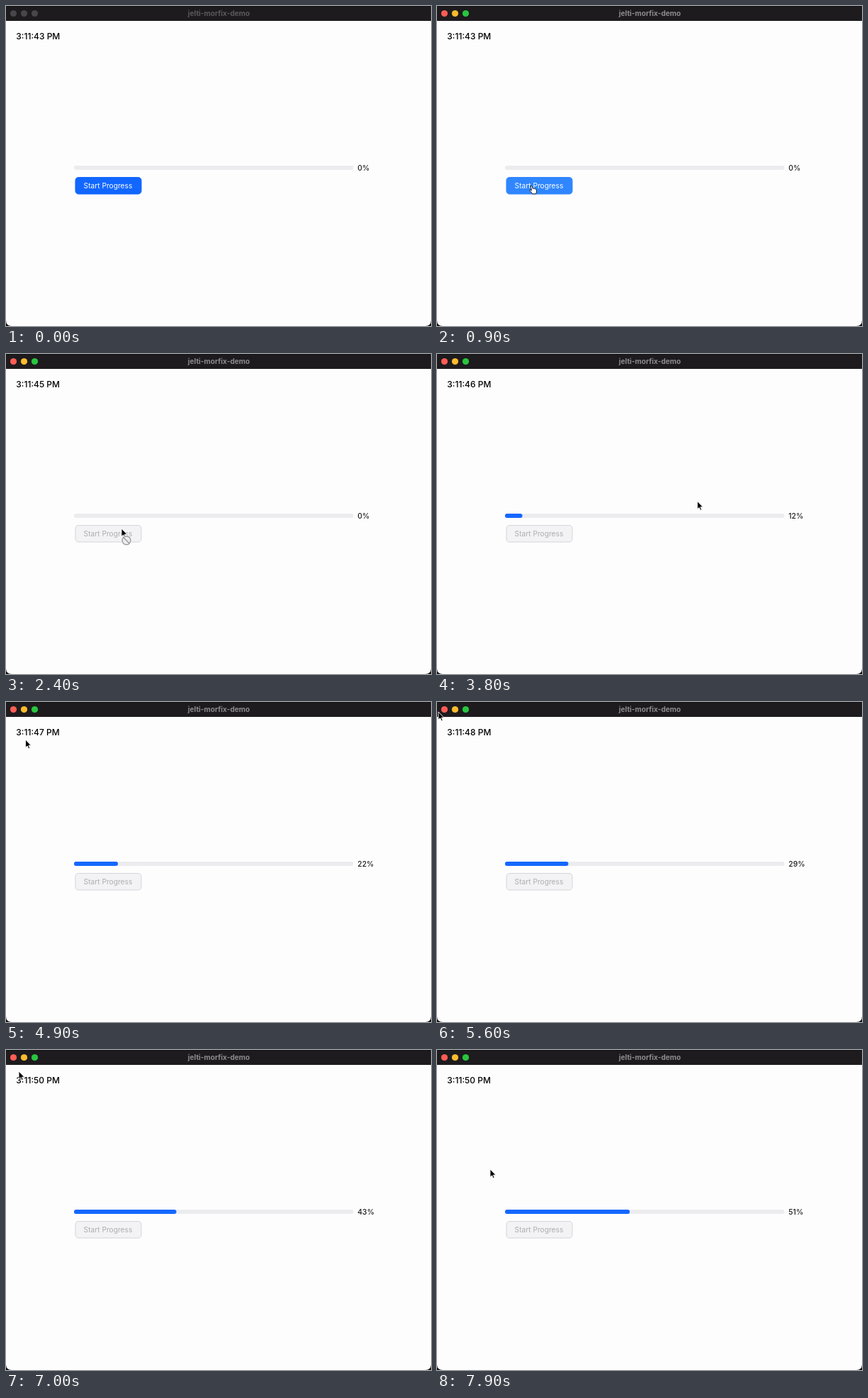
These frames come from a looping animation (600x451 px, 8 s). An HTML page:

```html
<!DOCTYPE html>
<html lang="en">
<head>
<meta charset="utf-8">
<title>Progress window</title>
<style>
  html, body { margin: 0; width: 100%; height: 100%; overflow: hidden; background: #0d100f; }
  svg { display: block; width: 600px; height: 451px; font-family: Inter, "Open Sans", sans-serif; }
  text { font-weight: 500; }

  #title { font-size: 10.1px; font-weight: 700; text-anchor: middle; fill: #5b595c; }
  #clock { font-size: 12px; fill: #000; }
  #percent { font-size: 10.4px; fill: #1a1a1b; }
  #lights { fill: #484649; }
  #button { fill: #1167ff; stroke: #1167ff; }
  #label { font-size: 10.2px; font-weight: 400; fill: #fff; }

  .active #title { fill: #8d8b8e; }
  .active #red { fill: #ff5d55; }
  .active #yellow { fill: #febb2d; }
  .active #green { fill: #29c63f; }
  .active #button { fill: #2f86ff; stroke: #2f86ff; }
  .disabled #button { fill: #f3f2f4; stroke: #d5d4d7; }
  .disabled #label { fill: #adacaf; }

  #arrow, #hand, #forbidden { visibility: hidden; }
  .arrow #arrow, .hand #hand, .forbidden #forbidden { visibility: visible; }
</style>
</head>
<body>
<svg id="stage" viewBox="0 0 600 451">
  <path d="M0 20H600V443Q600 451 592 451H8Q0 451 0 443Z" fill="#fefdfe"/>
  <rect width="600" height="21" fill="#1d1b1e"/>
  <rect width="600" height="1" fill="#111012"/>
  <g id="lights">
    <circle id="red" cx="10.5" cy="10.5" r="4.6"/>
    <circle id="yellow" cx="25.5" cy="10.5" r="4.6"/>
    <circle id="green" cx="40.5" cy="10.5" r="4.6"/>
  </g>
  <text id="title" x="300.5" y="13.7">jelti-morfix-demo</text>
  <text id="clock" x="14.3" y="46.8"></text>

  <rect x="96" y="225" width="394.5" height="6" rx="3" fill="#ececee"/>
  <rect id="bar" x="96" y="225.1" height="5.8" rx="2.9" fill="#1567ff"/>
  <text id="percent" x="496.3" y="231.7"></text>

  <rect id="button" x="98" y="241.5" width="93" height="23.5" rx="4.3"/>
  <text id="label" x="109.6" y="257">Start Progress</text>

  <g id="pointer">
    <path id="arrow" d="M0 0V11.2L2.6 8.9L4.4 12.8L6.2 12L4.5 8.2H8Z" stroke="#fff" stroke-width=".9" stroke-linejoin="round"/>
    <g id="forbidden" fill="none">
      <circle cx="7" cy="16.8" r="6" stroke="#fff" stroke-width="3"/>
      <circle cx="7" cy="16.8" r="6" fill="#ededee" stroke="#9c9c9e" stroke-width="1.5"/>
      <path d="M3 12.8L11 20.8" stroke="#9c9c9e" stroke-width="1.5"/>
    </g>
    <path id="hand" fill="#fff" stroke="#111" stroke-width=".9" stroke-linejoin="round"
      d="M2 1Q3-.6 4 1L5.2 4.6Q6.2 3.6 7 4.8Q8.2 4 8.8 5.3Q10.2 5 10.3 6.8Q10.5 9 9.5 12H4.5Q3.6 10 1 7.6Q.3 6 2 6.2L3.4 7.3Z"/>
  </g>
</svg>
<script>
  const LOOP = 8000, STEP = 100;
  const ENTER = 200, FOCUS = 900, CLICK = 1900, FIRST_TICK = 2500, TICK = 104.5;
  const TRACK = 394.5, LAG = 6.35;
  const $ = id => document.getElementById(id);

  // Where the pointer rests or turns
  const stops = [
    { t: ENTER, x: 281, y: 362 },
    { t: 600, x: 115, y: 256 },
    { t: 1400, x: 163, y: 246 },
    { t: 2400, x: 163, y: 246 },
    { t: 3200, x: 325, y: 328 },
    { t: 3800, x: 367.5, y: 207.5 },
    { t: 4900, x: 27.5, y: 53 },
    { t: 5500, x: 1, y: 11 },
    { t: 6200, x: 17.5, y: 63 },
    { t: 7000, x: 18, y: 30 },
    { t: 7900, x: 75, y: 168 }
  ];
  const smooth = u => u * u * (3 - 2 * u);
  const mix = (a, b, u) => a + (b - a) * u;

  function pointerAt(t) {
    const next = stops.findIndex(stop => stop.t >= t);
    if (next < 1) return stops[0];
    const a = stops[next - 1], b = stops[next];
    const u = smooth((t - a.t) / (b.t - a.t));
    return { x: mix(a.x, b.x, u), y: mix(a.y, b.y, u) };
  }

  function render(elapsed) {
    const t = Math.floor(elapsed % LOOP / STEP) * STEP;
    const { x, y } = pointerAt(t);
    const active = t >= FOCUS, disabled = t >= CLICK;
    const hand = active && !disabled;
    const overButton = x > 98 && x < 191 && y > 241 && y < 265;

    const states = {
      active, disabled, hand,
      arrow: t >= ENTER && !hand,
      forbidden: disabled && overButton
    };
    for (const name in states) $('stage').classList.toggle(name, states[name]);
    $('pointer').setAttribute('transform', `translate(${x} ${y})`);

    // The bar eases after the number and trails it by a few percent.
    const percent = Math.max(0, Math.floor((t - FIRST_TICK) / TICK));
    const filled = Math.max(0, percent - LAG * (1 - Math.exp(-percent / 5)));
    $('bar').setAttribute('width', TRACK * filled / 100);
    $('percent').textContent = `${percent}%`;
    $('clock').textContent = `3:11:${43 + Math.floor(t / 1000)} PM`;
  }

  const start = performance.now();
  (function frame() {
    render(performance.now() - start);
    requestAnimationFrame(frame);
  })();
</script>
</body>
</html>
```
